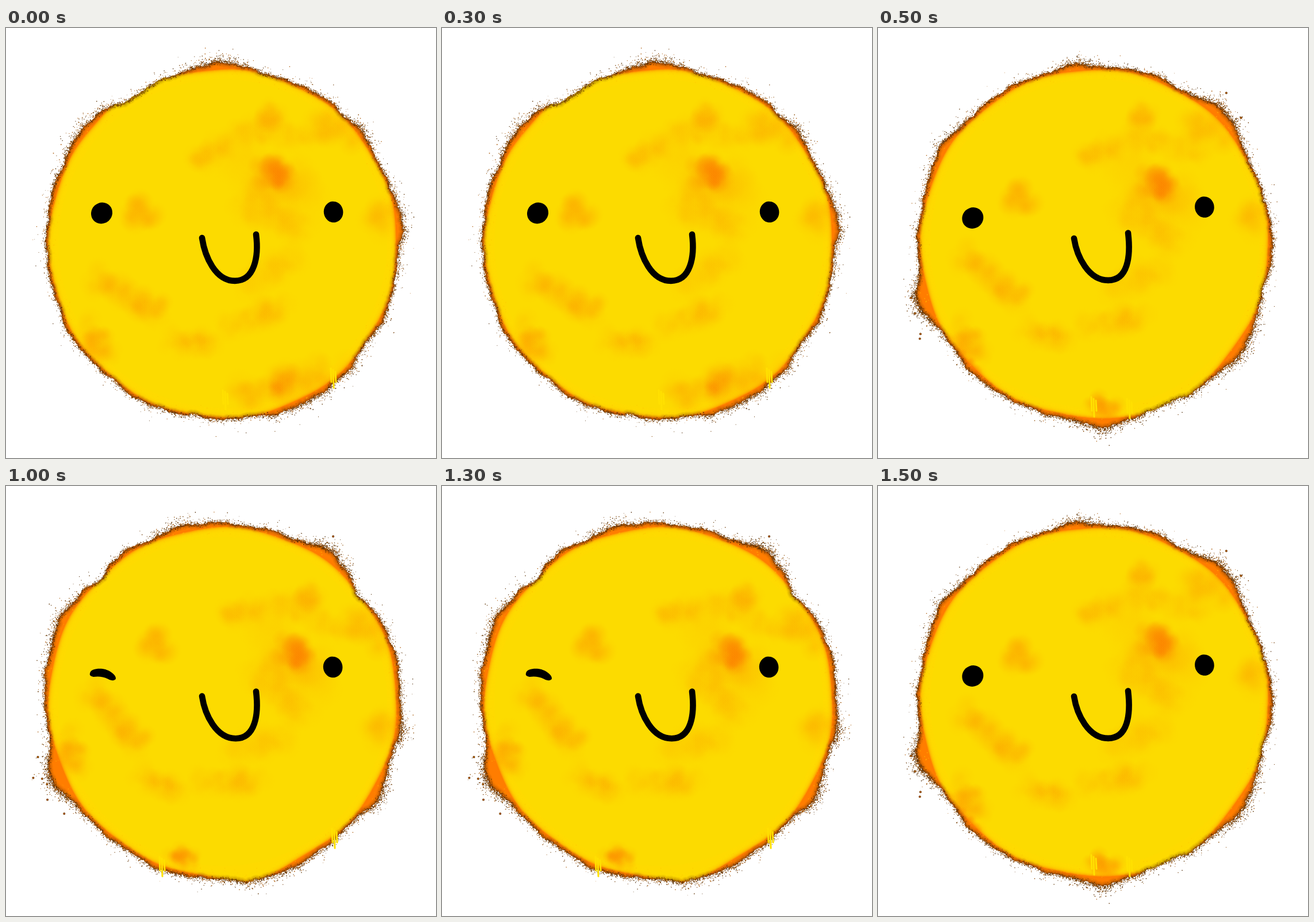
These frames come from a looping animation (748 px wide and 748 px high, 2000 ms). An HTML page with a canvas:

```html
<!DOCTYPE html>
<html lang="en">
<head>
<meta charset="utf-8">
<title>Smiling sun</title>
<style>
html, body { margin: 0; width: 100%; height: 100%; overflow: hidden; background: #fff; }
canvas { display: block; width: 748px; height: 748px; }
</style>
</head>
<body>
<canvas id="stage" width="748" height="748"></canvas>
<script>
const SIZE = 748, CX = 377, CY = 375, TAU = Math.PI * 2, RAD = Math.PI / 180;
const TONES = ['#4a2500', '#6b3600', '#8a4800', '#5a3000', '#a85400'];

// Cloud bands: x1, y1, x2, y2, spread, strength
const inner = [
  [450, 248, 482, 250, 28, .17], [420, 250, 515, 280, 50, .035],
  [235, 318, 235, 320, 30, .09], [325, 240, 390, 192, 24, .035],
  [400, 180, 530, 185, 26, .03], [405, 305, 520, 350, 30, .03],
  [155, 435, 275, 498, 28, .05], [280, 540, 365, 550, 24, .035],
  [390, 515, 485, 485, 26, .035], [420, 450, 500, 395, 28, .025]
];
const outer = [
  [458, 152, 462, 158, 26, .06], [545, 160, 600, 190, 30, .045],
  [655, 325, 655, 330, 32, .05], [145, 525, 170, 565, 28, .065]
];

// bumps: bearing in degrees, height, width; bare: bearing without a rim
const poses = [
  {
    seed: 11, radius: 307, innerTurn: 0, outerTurn: 0, tilt: 1, bare: 240,
    bumps: [[268, 8, 6], [216, 9, 12], [239, -8, 9], [320, 4, 4], [54, 6, 14], [37, -6, 5], [100, -5, 5], [353, 5, 8]],
    bands: [[400, 640, 585, 595, 32, .055], [470, 628, 472, 630, 16, .07]],
    drips: [[378, 630], [566, 592]]
  },
  {
    seed: 23, radius: 308.5, innerTurn: 10.5, outerTurn: 0, tilt: 9.5, bare: 65,
    bumps: [[265, 6, 5], [314, 13, 8], [36, 9, 8], [88, 9, 8], [161, 15, 6], [214, 6, 10], [12, -6, 6], [336, -6, 8]],
    bands: [[375, 655, 405, 662, 22, .1], [110, 535, 175, 602, 14, .08]],
    drips: [[372, 642], [434, 645]]
  },
  {
    seed: 37, radius: 309.5, innerTurn: 20, outerTurn: 19, tilt: 6, bare: 82, wink: true,
    bumps: [[255, 5, 6], [305, 12, 6], [321, -9, 5], [10, 6, 3], [31, 7, 6], [77, 6, 12], [155, 17, 7], [205, 9, 9], [225, -10, 4]],
    bands: [[295, 642, 325, 650, 18, .11]],
    drips: [[268, 645], [568, 596]]
  }
];

function random(seed) {
  return () => {
    seed = (seed + 0x6D2B79F5) | 0;
    let t = Math.imul(seed ^ (seed >>> 15), 1 | seed);
    t = (t + Math.imul(t ^ (t >>> 7), 61 | t)) ^ t;
    return ((t ^ (t >>> 14)) >>> 0) / 4294967296;
  };
}

const bell = rnd => rnd() + rnd() + rnd() - 1.5;

// Gaussian hill around a bearing, in degrees
function hill(deg, at, width) {
  const d = ((deg - at + 540) % 360 - 180) / width;
  return Math.exp(-d * d);
}

function polar(deg, r) {
  return [CX + Math.cos(deg * RAD) * r, CY + Math.sin(deg * RAD) * r];
}

function ring(radius) {
  const path = new Path2D();
  for (let deg = 0; deg < 360; deg += .5) path.lineTo(...polar(deg, radius(deg)));
  path.closePath();
  return path;
}

function dot(c, [x, y], r, color) {
  c.fillStyle = color;
  c.beginPath();
  c.arc(x, y, r, 0, TAU);
  c.fill();
}

function edgeOf(pose, rnd) {
  const waves = [9, 14, 23, 37, 61].map((f, i) => [f, 1.4 - i * .2, rnd() * TAU]);
  return deg => pose.radius
    + pose.bumps.reduce((sum, [at, h, w]) => sum + h * hill(deg, at, w), 0)
    + waves.reduce((sum, [f, a, p]) => sum + a * Math.sin(f * deg * RAD + p), 0);
}

function puff(c, x, y, r, a) {
  const g = c.createRadialGradient(x, y, 0, x, y, r);
  [1, .55, 0].forEach((k, i) => g.addColorStop(i / 2, `rgba(255,120,0,${a * k})`));
  c.fillStyle = g;
  c.fillRect(x - r, y - r, 2 * r, 2 * r);
}

function clouds(c, bands, turn, seed) {
  const rnd = random(seed);
  c.save();
  c.translate(CX, CY);
  c.rotate(turn * RAD);
  c.translate(-CX, -CY);
  for (const [x1, y1, x2, y2, r, a] of bands) {
    const count = 18 + 12 * Math.hypot(x2 - x1, y2 - y1) / r;
    for (let i = 0; i < count; i++) {
      const t = rnd(), q = rnd() * TAU, d = r * .8 * Math.sqrt(rnd());
      puff(c, x1 + (x2 - x1) * t + Math.cos(q) * d, y1 + (y2 - y1) * t + Math.sin(q) * d, r * (.45 + rnd() * .45), a);
    }
  }
  c.restore();
}

function body(c, pose, edge, rnd) {
  const shape = ring(deg => edge(deg) + (rnd() - .5) * 2.6);
  c.save();
  c.clip(shape);
  c.fillStyle = '#ff7d00';
  c.fillRect(0, 0, SIZE, SIZE);
  // Soft yellow disc, in thin layers
  c.fillStyle = 'rgba(252,219,0,.3)';
  for (let k = 7; k >= -8; k--) {
    c.fill(ring(deg => 296 + k + 1.5 * Math.sin(deg * RAD * 11 + pose.seed) + 13 * hill(deg, pose.bare, 12)));
  }
  c.fillStyle = '#fcdb00';
  c.fill(ring(() => 286));
  clouds(c, inner, pose.innerTurn, 5);
  clouds(c, outer, pose.outerTurn, 8);
  clouds(c, pose.bands, 0, pose.seed);
  // Scorched rim
  c.lineJoin = 'round';
  for (let w = 15; w > 2; w -= 3) {
    c.lineWidth = w;
    c.strokeStyle = `rgba(90,45,0,${.9 / w})`;
    c.stroke(shape);
  }
  c.restore();
}

function spray(c, pose, edge, rnd) {
  const tail = mean => -Math.log(1 - rnd() * .999) * mean;
  const fleck = (deg, out, size) => {
    const [x, y] = polar(deg, edge(deg) + out);
    c.fillStyle = TONES[rnd() * TONES.length | 0];
    c.fillRect(x + bell(rnd) * 2, y + bell(rnd) * 2, size, size);
  };
  for (let i = 0; i < 4000; i++) fleck(rnd() * 360, bell(rnd) * 3.6, .7 + rnd() * .8);
  for (let i = 0; i < 1000; i++) fleck(rnd() * 360, tail(5), .6 + rnd() * .8);
  for (const [at, height, width] of pose.bumps) {
    for (let i = 0; i < height * 28; i++) fleck(at + bell(rnd) * width * 1.6, tail(5), .8 + rnd() * .8);
    for (let i = 11; i < height; i++) {
      const p = polar(at + bell(rnd) * width * 2, edge(at) + 8 + rnd() * 22);
      dot(c, p, 2, '#653300');
      dot(c, p, 1.2, '#b85f00');
    }
  }
  for (let i = 0; i < 260; i++) {
    const deg = rnd() * 360;
    dot(c, polar(deg, edge(deg) - 3 - rnd() * 17), .4 + rnd() * .5, 'rgba(255,195,0,.7)');
  }
}

function drips(c, list) {
  c.strokeStyle = '#ffe000';
  c.lineWidth = 3;
  c.lineCap = 'round';
  for (const [x, y] of list) {
    for (let i = 0; i < 3; i++) {
      c.beginPath();
      c.moveTo(x + i * 4 - 1, y + i * 3);
      c.lineTo(x + i * 4, y + [24, 34, 24][i]);
      c.stroke();
    }
  }
}

function face(c, { tilt, wink }) {
  const eye = (x, y, rx, ry, turn) => {
    c.beginPath();
    c.ellipse(x - tilt * .2, y, rx, ry, turn, 0, TAU);
    c.fill();
  };
  c.fillStyle = c.strokeStyle = '#000';
  if (wink) c.fill(new Path2D('M146 326C147 318 160 317 168 318C182 320 192 330 191 335C190 339 183 339 178 336C168 331 160 331 152 332C147 331 145 329 146 326Z'));
  else eye(166.7, 321 + tilt, 19, 18, -.75);
  eye(569.8, 321 - tilt, 16.8, 18.4, -.15);

  const low = 440 - tilt * .12, mid = 398 + tilt * .25;
  c.lineWidth = 10.6;
  c.lineCap = 'round';
  c.beginPath();
  c.moveTo(341, 365 + tilt * .1);
  c.bezierCurveTo(346, 398, mid - 34, low, mid, low);
  c.bezierCurveTo(mid + 34, low, 440, 398, 435, 359.3 - tilt * .3);
  c.stroke();
}

function paint(pose) {
  const cv = document.createElement('canvas');
  cv.width = cv.height = SIZE;
  const c = cv.getContext('2d'), rnd = random(pose.seed), edge = edgeOf(pose, rnd);
  c.fillStyle = '#fff';
  c.fillRect(0, 0, SIZE, SIZE);
  body(c, pose, edge, rnd);
  spray(c, pose, edge, rnd);
  drips(c, pose.drips);
  face(c, pose);
  return cv;
}

const pictures = poses.map(paint);
const order = [0, 1, 2, 1];
const stage = document.getElementById('stage').getContext('2d');
let shown = -1;

function show(ms) {
  const k = order[Math.floor(ms % 2000 / 500)];
  if (k !== shown) stage.drawImage(pictures[shown = k], 0, 0);
}

function tick(now) {
  show(now);
  requestAnimationFrame(tick);
}
show(0);
requestAnimationFrame(tick);
</script>
</body>
</html>
```
